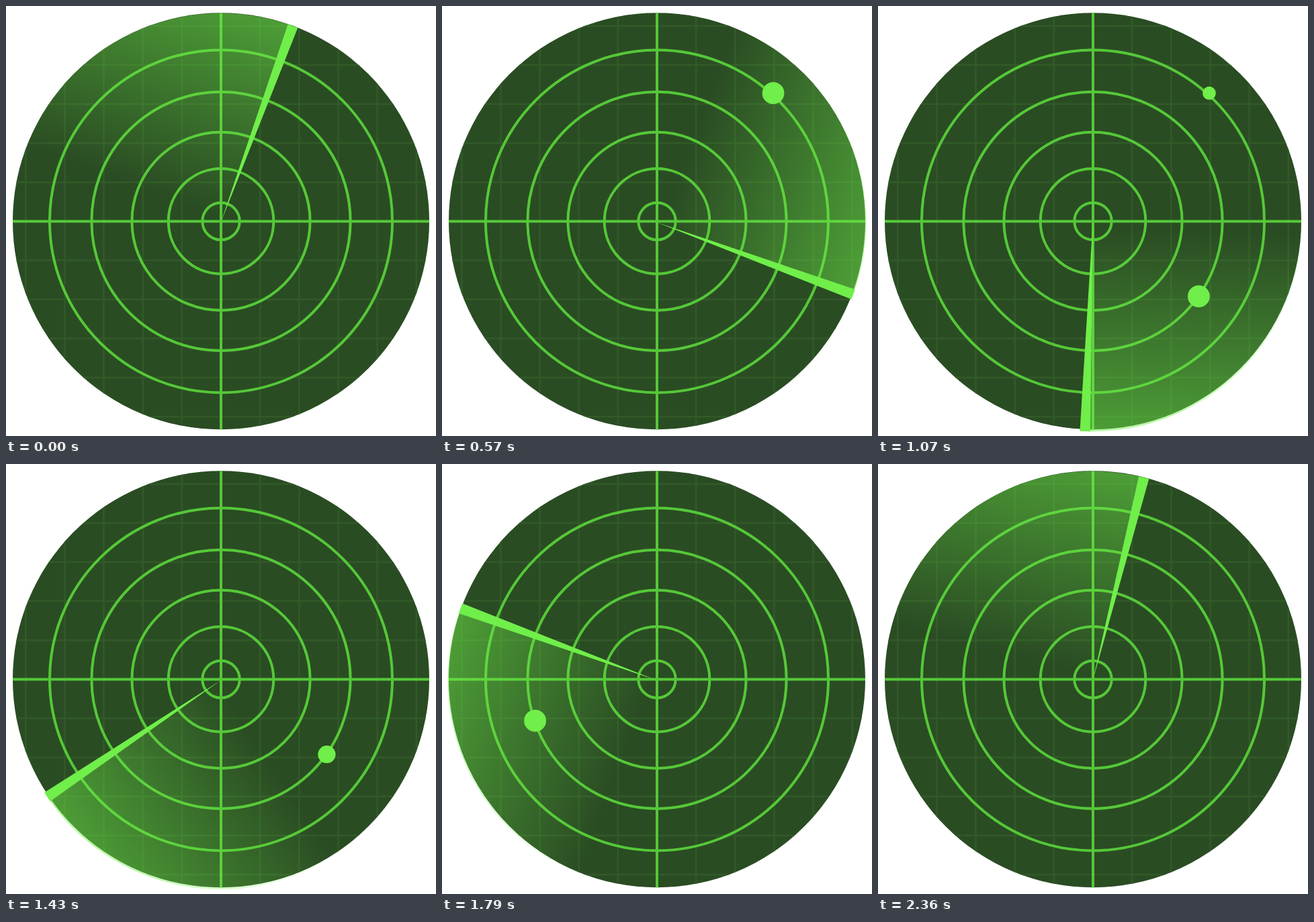
Write an HTML page that moves like this. It is 640x640 px and loops after 2.43 s.

```html
<!DOCTYPE html>
<html lang="en">
<head>
<meta charset="utf-8">
<title>Radar</title>
<style>
  html, body { margin: 0; width: 100%; height: 100%; overflow: hidden; background: #fff; }
  svg { display: block; width: 100%; height: 100%; }
  .dial { fill: #2a4c23; }
  .grid { stroke: #315a28; stroke-width: 2.5; }
  .rings { fill: none; stroke: #55c838; stroke-width: 4; }
  .beam, .blips { fill: #70ee4a; }
</style>
</head>
<body>
<svg viewBox="0 0 640 640">
  <defs>
    <clipPath id="disc"><circle cx="320" cy="320.3" r="310"/></clipPath>
    <linearGradient id="glow" gradientUnits="userSpaceOnUse" x1="0" y1="-8" x2="0" y2="-311">
      <stop offset="0" stop-color="#70ee4a" stop-opacity="0"/>
      <stop offset="1" stop-color="#70ee4a" stop-opacity=".5"/>
    </linearGradient>
  </defs>
  <circle class="dial" cx="320" cy="320.3" r="310"/>
  <g clip-path="url(#disc)">
    <path class="grid" id="grid"/>
    <path class="rings" d="M10 320.4H630M320 10V631"/>
  </g>
  <g class="rings" id="rings"></g>
  <g id="sweep">
    <path fill="url(#glow)" d="M0 0V-311.2A311.2 311.2 0 0 0 -311.2 0Z"/>
    <path class="beam" d="M0 0L-7.8 -311.2H7.8Z"/>
  </g>
  <g class="blips" id="blips"></g>
</svg>
<script>
  const LOOP = 2430, FPS = 14, STEP_RATE = 25;
  const GROW = 5, BLIP_R = 16.4;
  const $ = id => document.getElementById(id);

  function addCircle(parent, cx, cy, r) {
    const c = document.createElementNS('http://www.w3.org/2000/svg', 'circle');
    c.setAttribute('cx', cx);
    c.setAttribute('cy', cy);
    c.setAttribute('r', r);
    return parent.appendChild(c);
  }

  let grid = '';
  for (let i = -5; i <= 5; i++) {
    if (!i) continue;
    const d = i * 58.15;
    grid += `M${320 + d} 0V640M0 ${320.4 + d}H640`;
  }
  $('grid').setAttribute('d', grid);

  for (const r of [255, 192.6, 132.6, 78.3, 27.7]) addCircle($('rings'), 320, 320.4, r);

  // from: starts growing, to: fully shrunk (in steps of the sweep)
  const blips = [
    { x: 493, y: 129.7, from: 0, to: 30 },
    { x: 477.4, y: 432.2, from: 15, to: 40 },
    { x: 138.6, y: 382.2, from: 38, to: 59 }
  ];
  for (const b of blips) b.el = addCircle($('blips'), b.x, b.y, 0);

  // The display shows a 25 Hz sweep at 14 Hz, on a 10 ms clock.
  function sweepStep(t) {
    const tick = Math.floor((t + 0.1) / 10);
    const shown = Math.floor((tick + 0.5) * FPS / 100);
    return Math.floor((shown + 0.5) * STEP_RATE / FPS);
  }

  function draw(t) {
    const n = sweepStep(t);
    $('sweep').setAttribute('transform', `translate(319.8 322) rotate(${20.13 + 6 * n})`);
    for (const b of blips) {
      const scale = Math.min(1, (n - b.from) / GROW, (b.to - n) / GROW);
      b.el.setAttribute('r', BLIP_R * Math.max(0, scale));
    }
  }

  const start = performance.now();
  function tick(now) {
    draw(Math.max(0, now - start) % LOOP);
    requestAnimationFrame(tick);
  }
  draw(0);
  requestAnimationFrame(tick);
</script>
</body>
</html>
```
